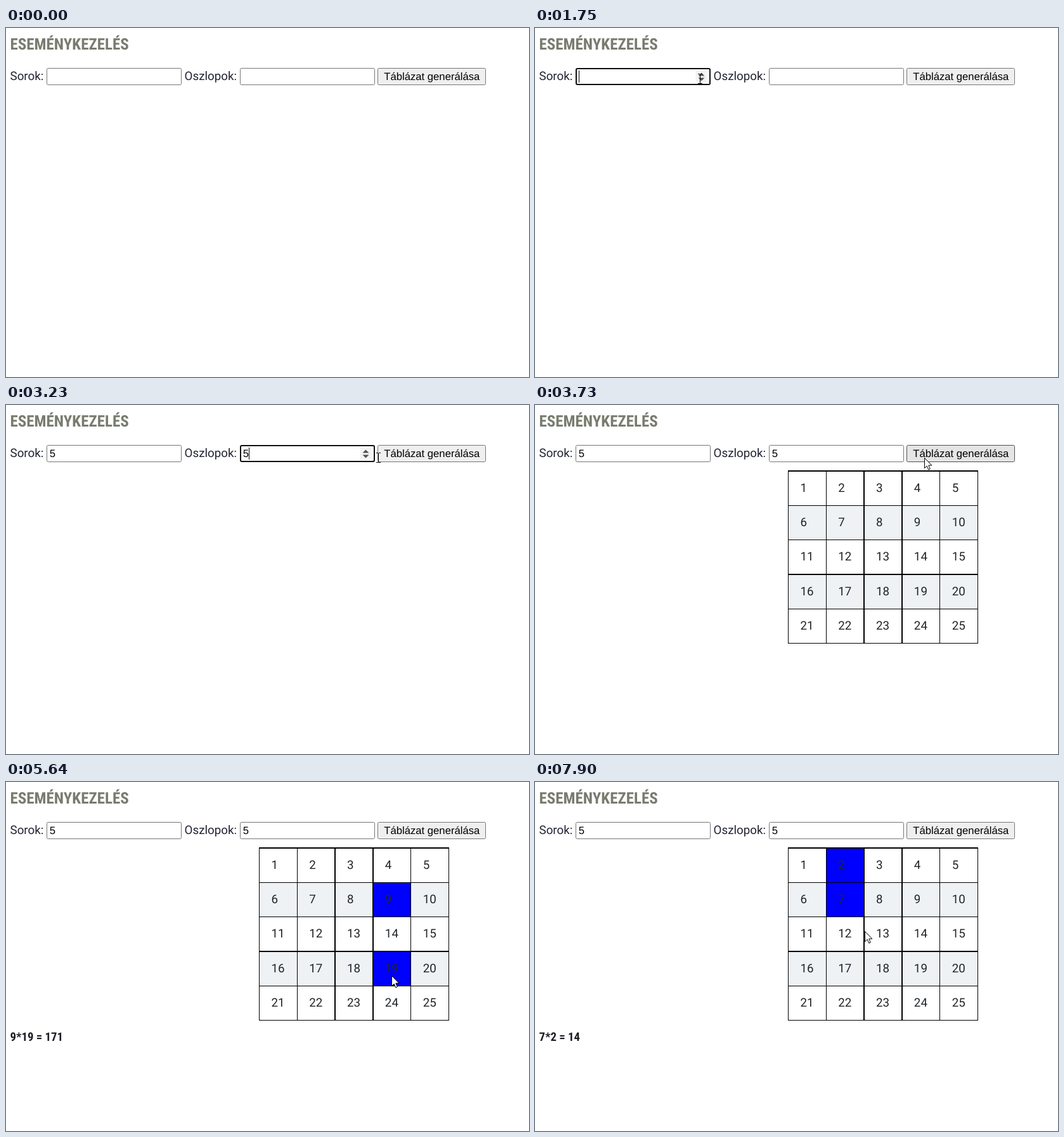
An HTML page with a canvas for the animation above (8000 ms loop, 825x550 px).

```html
<!DOCTYPE html>
<html lang="hu">
<head>
<meta charset="utf-8">
<title>Eseménykezelés</title>
<style>
  html, body { margin: 0; width: 100%; height: 100%; overflow: hidden; background: #fff; }
  canvas { display: block; }
</style>
</head>
<body>
<canvas id="stage" width="825" height="550"></canvas>
<script>
const ctx = document.getElementById('stage').getContext('2d');
ctx.textRendering = 'geometricPrecision';

const LOOP = 8000;
const SIZE = 5;
const TABLE_SHOWN = 3500;

const BODY = '18.75px Roboto, sans-serif';
const CONTROL = '16.667px "Liberation Sans", Arial, sans-serif';
const condensed = size => `bold condensed ${size}px "Roboto Condensed", Roboto, sans-serif`;
const INK = '#212433';

const control = (x, w, extra) => ({ x, y: 63, w, h: 27, ...extra });
const inputs = [
  control(64, 213, { focus: 1430, typed: 1880, blur: 2720 }),
  control(369, 213, { focus: 2720, typed: 2960, blur: 3440 })
];
const button = control(586, 171);

// Clicked numbers; every second click completes a product
const clicks = [
  { n: 9, at: 4830 }, { n: 19, at: 5570 },
  { n: 7, at: 6740 }, { n: 2, at: 7500 }
];

// Pointer moves: start, end, target x, target y, downward sag on the way
const moves = [
  [320, 460, 753, 532],
  [720, 1490, 260, 80],
  [1750, 2500, 400, 83, 25],
  [2960, 3310, 615, 83],
  [4190, 4690, 608, 181],
  [5020, 5500, 609, 305],
  [5900, 6640, 492, 201, 70],
  [6900, 7350, 495, 120],
  [7560, 7890, 521, 235]
];

const smooth = k => k * k * (3 - 2 * k);

function pointerAt(t) {
  if (t < moves[0][0]) return null;
  let x = 762, y = 550;
  for (const [from, to, endX, endY, sag = 0] of moves) {
    const k = Math.max(0, Math.min(1, (t - from) / (to - from)));
    x += (endX - x) * smooth(k);
    y += (endY - y) * smooth(k) + sag * Math.sin(Math.PI * k);
  }
  return { x, y };
}

const inside = (p, box, pad = 0) => p && p.x >= box.x - pad && p.x <= box.x + box.w + pad
  && p.y >= box.y && p.y <= box.y + box.h;

function text(value, x, y, font, color = INK, align = 'left') {
  ctx.font = font;
  ctx.fillStyle = color;
  ctx.textAlign = align;
  ctx.fillText(value, x, y);
}

function rect(x, y, w, h, color) {
  ctx.fillStyle = color;
  ctx.fillRect(x, y, w, h);
}

function polygon(points) {
  ctx.beginPath();
  points.forEach(([x, y]) => ctx.lineTo(x, y));
  ctx.closePath();
  ctx.fill();
}

function frame({ x, y, w, h }, fill, border, line = 1) {
  ctx.beginPath();
  ctx.roundRect(x + line / 2, y + line / 2, w - line, h - line, 2);
  ctx.fillStyle = fill;
  ctx.fill();
  ctx.strokeStyle = border;
  ctx.lineWidth = line;
  ctx.stroke();
}

function drawSpinner(x, y) {
  rect(x - 9, y - 10, 18, 19, '#f3f3f3');
  ctx.fillStyle = '#505050';
  for (const dir of [-1, 1]) {
    const base = y + dir * 1.5;
    polygon([[x - 5, base], [x + 5, base], [x, base + dir * 5]]);
  }
}

function drawInput(box, t, pointer) {
  const focused = t >= box.focus && t < box.blur;
  const hovered = inside(pointer, box);
  const filled = t >= box.typed;
  frame(box, '#fff', focused ? '#101010' : hovered ? '#4f4f4f' : '#767676', focused ? 2 : 1);
  if (filled) text('5', box.x + 4.8, 82, CONTROL, '#000');
  if (focused) rect(box.x + (filled ? 14 : 5), 67, 1, 19, '#000');
  if (focused || hovered) drawSpinner(box.x + 198.5, 77);
}

function drawButton(pointer) {
  const hot = inside(pointer, button, -2);
  frame(button, hot ? '#e5e5e5' : '#efefef', hot ? '#4f4f4f' : '#767676');
  text('Táblázat generálása', 671.8, 82, CONTROL, '#000', 'center');
}

const columnAt = c => 399.25 + 59.8 * c;
const rowAt = r => 103.7 + 54.35 * r;

// Snaps a fractional grid line to whole pixels
const snap = p => ({ at: Math.floor(p), width: p % 1 > 0.5 ? 2 : 1 });

function cell(n) {
  const c = (n - 1) % SIZE, r = Math.floor((n - 1) / SIZE);
  const x = columnAt(c), y = rowAt(r);
  return {
    n, r, x, y,
    label: { x: x + 19.2, y: y + 15, w: n < 10 ? 10.5 : 21, h: 22 },
    baseline: Math.round(y + 33)
  };
}
const cells = Array.from({ length: SIZE * SIZE }, (_, i) => cell(i + 1));

function drawTable(selected) {
  for (const { n, r, x, y, label, baseline } of cells) {
    const fill = selected.includes(n) ? '#00f' : r % 2 ? '#eef2f5' : '#fff';
    rect(Math.floor(x), Math.floor(y), 60, 55, fill);
    text(n, label.x, baseline, BODY, '#212529');
  }
  for (let i = 0; i <= SIZE; i++) {
    const column = snap(columnAt(i)), row = snap(rowAt(i));
    rect(column.at, 103, column.width, 273, '#000');
    rect(399, row.at, 300, row.width, '#000');
  }
}

function drawBeam(x, y) {
  rect(x, y - 7, 1, 15, '#000');
  for (const end of [-8, 7]) {
    rect(x - 3, y + end, 3, 1, '#000');
    rect(x + 1, y + end, 3, 1, '#000');
  }
}

function drawArrow(x, y) {
  ctx.save();
  ctx.translate(x - 0.5, y + 0.5);
  ctx.fillStyle = '#fff';
  polygon([[0, 0], [0, 16], [3.7, 12.6], [6.3, 18.5], [8.8, 17.4], [6.3, 11.6], [11.3, 11.6]]);
  ctx.strokeStyle = '#000';
  ctx.lineWidth = 1;
  ctx.stroke();
  ctx.restore();
}

function drawPointer(pointer, tableShown) {
  const overText = inputs.some(box => inside(pointer, box, 6))
    || tableShown && cells.some(({ label }) => inside(pointer, label, 1));
  (overText ? drawBeam : drawArrow)(Math.round(pointer.x), Math.round(pointer.y));
}

function draw(t) {
  const pointer = pointerAt(t);
  const tableShown = t >= TABLE_SHOWN;
  const clicked = clicks.filter(click => t >= click.at).map(click => click.n);
  const complete = clicked.length - clicked.length % 2;

  rect(0, 0, 825, 550, '#fff');
  text('ESEMÉNYKEZELÉS', 6.5, 34, condensed(25), '#787c6f');
  text('Sorok:', 6.5, 82, BODY);
  text('Oszlopok:', 281.6, 82, BODY);
  for (const box of inputs) drawInput(box, t, pointer);
  drawButton(pointer);
  if (tableShown) drawTable(clicked.slice(clicked.length % 2 ? -1 : -2));
  if (complete) {
    const [a, b] = clicked.slice(complete - 2, complete);
    text(`${a}*${b} = ${a * b}`, 6.5, 408, condensed(18.75), '#1c1e24');
  }
  if (pointer) drawPointer(pointer, tableShown);
}

const start = performance.now();
function tick() {
  draw((performance.now() - start) % LOOP);
  requestAnimationFrame(tick);
}
tick();
</script>
</body>
</html>
```
